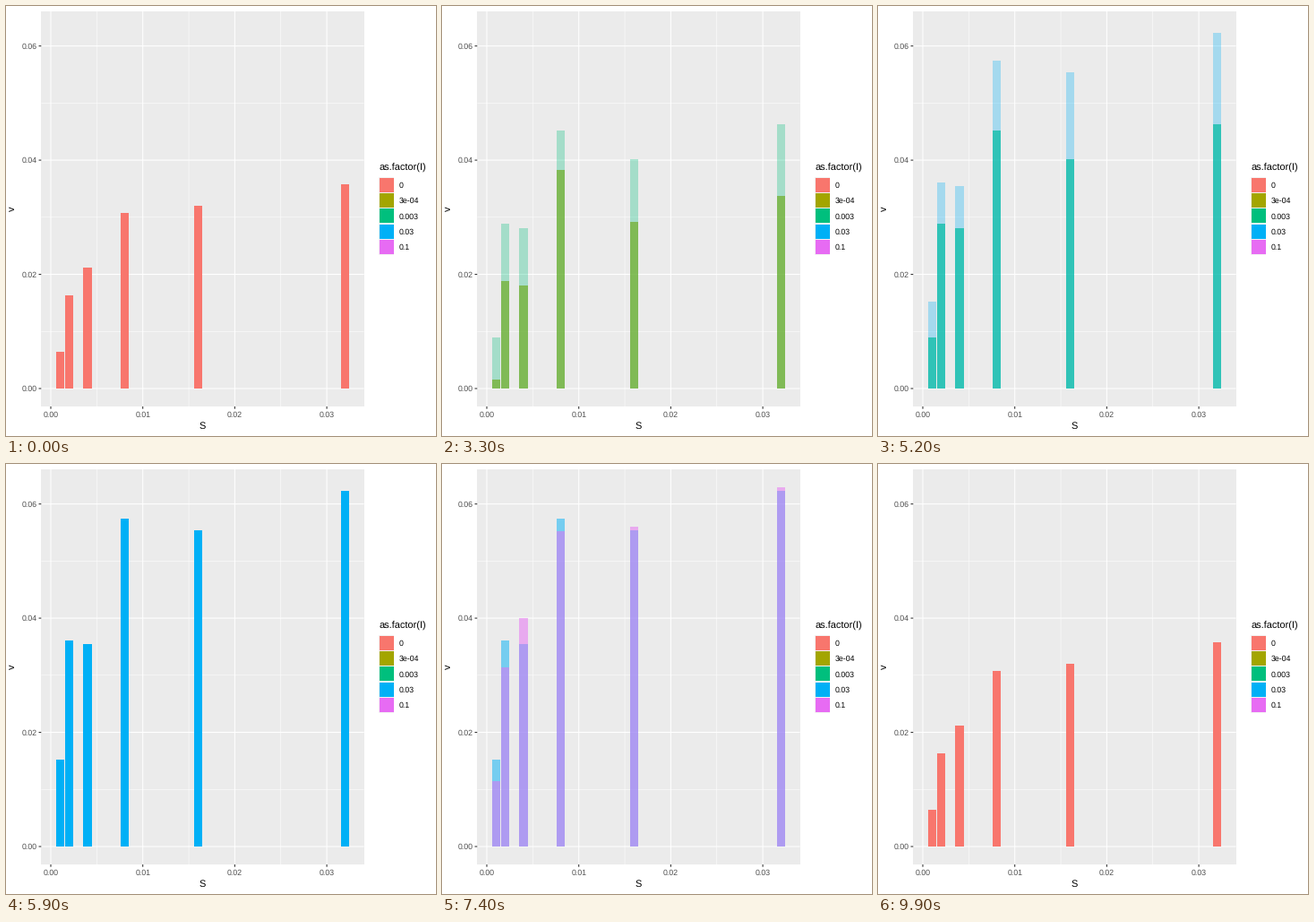
A matplotlib script for the animation above (10 s loop, 480 by 480 pixels).

```python
import matplotlib.pyplot as plt
from matplotlib.animation import FuncAnimation
from matplotlib.patches import Rectangle

SIZE = 480
PT = 0.72  # points per pixel at 100 dpi
plt.rcParams["font.family"] = "Liberation Sans"
plt.rcParams["text.hinting"] = "none"

LEFT, RIGHT, TOP, BOTTOM = 39.3, 399.6, 5.5, 447.0
X0, X_UNIT = 50.0, 10270
Y0, Y_UNIT = 427.0, 6373
BAR_W = 0.0009

S = [0.001, 0.002, 0.004, 0.008, 0.016, 0.032]
STATES = [
    ("0", "#F8766D", [0.0064, 0.0163, 0.0212, 0.0307, 0.0320, 0.0358]),
    ("3e-04", "#A3A500", [0.0015, 0.0188, 0.0180, 0.0383, 0.0292, 0.0337]),
    ("0.003", "#00BF7D", [0.0089, 0.0289, 0.0281, 0.0452, 0.0402, 0.0463]),
    ("0.03", "#00B0F6", [0.0152, 0.0361, 0.0354, 0.0574, 0.0554, 0.0623]),
    ("0.1", "#E76BF3", [0.0114, 0.0314, 0.0400, 0.0552, 0.0560, 0.0630]),
]

# First frame of each crossfade; every fade takes ten frames.
FADE_STARTS = [11, 31, 50, 70, 90]
FADE_LEN = 10
FRAMES = 100

fig = plt.figure(figsize=(SIZE / 100, SIZE / 100), dpi=100, facecolor="white")
ax = fig.add_axes([0, 0, 1, 1])
ax.set_xlim(0, SIZE)
ax.set_ylim(SIZE, 0)
ax.axis("off")


def px(s):
    return X0 + s * X_UNIT


def py(v):
    return Y0 - v * Y_UNIT


def rect(x0, y0, x1, y1, color, z):
    """Filled box with edges on whole pixels."""
    x0, y0, x1, y1 = (round(c) for c in (x0, y0, x1, y1))
    box = Rectangle((x0, y0), x1 - x0, y1 - y0, fc=color, lw=0, zorder=z)
    return ax.add_patch(box)


def line(xs, ys, color, width):
    ax.plot(xs, ys, color=color, lw=width * PT, zorder=1, snap=False,
            solid_capstyle="butt")


def label(x, y, text, size=8.8, color="black", ha="left", rotation=0):
    ax.text(x, y, text, fontsize=size * PT, color=color, ha=ha,
            va="baseline", rotation=rotation, zorder=5)


def draw_panel():
    rect(LEFT, TOP, RIGHT, BOTTOM, "#EBEBEB", 0)
    for v in (0.01, 0.03, 0.05):
        line([LEFT, RIGHT], [py(v)] * 2, "white", 0.53)
    for s in (0.005, 0.015, 0.025):
        line([px(s)] * 2, [TOP, BOTTOM], "white", 0.53)
    for v in (0, 0.02, 0.04, 0.06):
        line([LEFT, RIGHT], [py(v)] * 2, "white", 1.07)
        line([LEFT - 2.74, LEFT], [py(v)] * 2, "#333333", 1.07)
        label(34.4, py(v) + 3.1, f"{v:.2f}", color="#4D4D4D", ha="right")
    for s in (0, 0.01, 0.02, 0.03):
        line([px(s)] * 2, [TOP, BOTTOM], "white", 1.07)
        line([px(s)] * 2, [BOTTOM, BOTTOM + 2.74], "#333333", 1.07)
        label(px(s), 458.5, f"{s:.2f}", color="#4D4D4D", ha="center")
    label((LEFT + RIGHT) / 2, 472, "S", size=11, ha="center")
    # Rotated text: right edge sits on the baseline.
    ax.text(11.8, (TOP + BOTTOM) / 2, "v", fontsize=11 * PT, rotation=90,
            ha="right", va="center", zorder=5)


def draw_legend():
    x, y, key = 416.1, 191.2, 17.28
    label(x, 184.2, "as.factor(I)", size=11)
    rect(x, y, x + key, y + key * len(STATES), "#F2F2F2", 0)
    for i, (name, color, _) in enumerate(STATES):
        top = y + i * key
        rect(x + 0.71, top + 0.71, x + key - 0.71, top + key - 0.71, color, 1)
        label(x + key + 5.5, top + key / 2 + 3.1, name)


def make_bars(color, values):
    half = BAR_W / 2
    return [rect(px(s - half), py(v), px(s + half), Y0, color, 2)
            for s, v in zip(S, values)]


draw_panel()
draw_legend()
groups = [make_bars(color, values) for _, color, values in STATES]


def fade_at(frame):
    """Return (outgoing state, incoming state, progress)."""
    passed = sum(frame >= start for start in FADE_STARTS)
    if passed == 0:
        return 0, 1, 0.0
    done = (frame - FADE_STARTS[passed - 1] + 1) / FADE_LEN
    return passed - 1, passed % len(STATES), min(done, 1.0)


def update(frame):
    old, new, t = fade_at(frame)
    for i, bars in enumerate(groups):
        alpha = 1 - t if i == old else t if i == new else 0
        for bar in bars:
            bar.set_alpha(alpha)
            bar.set_visible(alpha > 0)
            bar.set_zorder(3 if i == new else 2)
    return [bar for bars in groups for bar in bars]


anim = FuncAnimation(fig, update, frames=FRAMES, interval=100,
                     init_func=lambda: update(0), repeat=True, repeat_delay=0)
plt.show()
```
